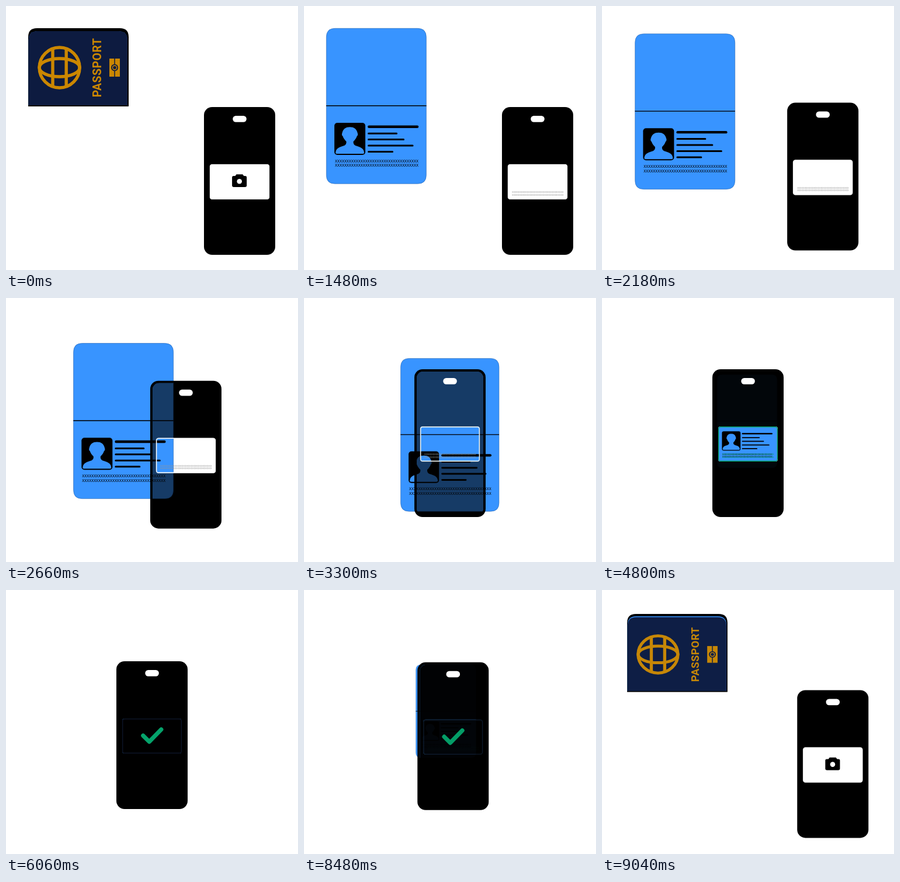
An HTML page that plays this animation: 500x452 px, repeating every 9.06 s.

```html
<!DOCTYPE html>
<html lang="en">
<head>
<meta charset="utf-8">
<title>Passport scan</title>
<style>
html, body { margin: 0; width: 100%; height: 100%; overflow: hidden; background: #fff; }
svg { display: block; width: 100vw; height: 100vh; }
.mrz { font: 6.6px "DejaVu Sans Mono", monospace; }
.title { font: 700 19.5px Roboto, sans-serif; letter-spacing: .45px; }
</style>
</head>
<body>
<svg viewBox="0 0 500 452">
  <defs>
    <clipPath id="screenClip"><rect class="phone" x="4" y="4" width="114" height="245" rx="11"/></clipPath>
    <clipPath id="windowClip"><rect class="phone" x="10" y="98" width="102" height="60" rx="4"/></clipPath>
    <g id="mrz" class="mrz">
      <text id="row1" x="15" y="229.8"></text>
      <text id="row2" x="15" y="237.4"></text>
    </g>
  </defs>

  <g id="passport">
    <path id="base" d="M0 133.8V15Q0 0 15 0H157Q172 0 172 15V133.8Z"/>
    <path id="page" fill="#3894ff"/>
    <g id="data">
      <path d="M.3 132.5H171.3V251.5Q171.3 266.3 156.5 266.3H15Q.3 266.3 .3 251.5Z" fill="#3894ff" stroke="#1f5fae" stroke-width=".6"/>
      <rect x="14" y="162" width="53" height="55" rx="5"/>
      <path fill="#3894ff" d="M16 213C17 205 22 204 31 201Q35 199 34.5 194Q29.5 189 28.5 185Q26 183 27.3 179.5C29 172.5 33 169.3 40.5 169.3S52 172.5 53.7 179.5Q55 183 52.5 185Q51.5 189 46.5 194Q46 199 50 201C59 204 64 205 65 213Q65 215 62 215H19Q16 215 16 213Z"/>
      <g stroke="#000" stroke-width="3" stroke-linecap="round">
        <path d="M73.2 168.8H156" stroke-width="4.4"/>
        <path d="M72.5 180.2H120.5M72.5 190.6H132.5M72.5 201.1H148M72.5 211.6H113.5"/>
      </g>
      <use href="#mrz"/>
    </g>
    <g id="cover">
      <path fill="#0d1b40" d="M.8 132.5V20Q.8 5 15.8 5H155Q170 5 170 20V132.5Z"/>
      <g id="art" fill="#cb8700">
        <g fill="none" stroke="#cb8700" stroke-width="5.4">
          <circle cx="53.6" cy="67.5" r="34.5"/>
          <ellipse cx="53.6" cy="67.5" rx="34.5" ry="15.5"/>
          <path d="M42 36V99M65.2 36V99"/>
        </g>
        <text class="title" text-anchor="middle" transform="translate(125 67.5) rotate(-90)">PASSPORT</text>
        <rect x="139" y="52" width="18" height="31"/>
        <path d="M148 52V83" stroke="#0d1b40" stroke-width="1.5"/>
        <circle cx="148" cy="67.5" r="6" fill="#0d1b40"/>
        <circle cx="148" cy="67.5" r="4.2"/>
        <circle cx="148" cy="67.5" r="2.8" fill="#0d1b40"/>
      </g>
    </g>
    <path d="M0 132.8H171.5" stroke="#000" stroke-width="1.4"/>
  </g>

  <rect class="phone" width="122" height="253" rx="14"/>
  <g clip-path="url(#screenClip)">
    <use href="#passport"/>
    <rect id="shade" width="500" height="452"/>
  </g>
  <g clip-path="url(#windowClip)">
    <rect id="blank" width="500" height="452"/>
    <use href="#passport"/>
    <rect id="cloak" width="500" height="452"/>
  </g>
  <g class="phone">
    <rect x="49.3" y="15" width="23.5" height="10.8" rx="5.2" fill="#fff"/>
    <rect id="rim" x="9.8" y="97.8" width="102.4" height="60.4" rx="4.3" fill="none" stroke="#888" stroke-width=".4"/>
    <rect id="frame" x="10.7" y="98.7" width="100.6" height="58.6" rx="3.6" fill="none" stroke-width="1.4"/>
    <use id="guide" href="#mrz" transform="translate(7.7 4.5) scale(.62)"/>
    <g id="camera">
      <path d="M50.5 118H53.5L55.5 115.3H66.3L68.3 118H70.8Q73.2 118 73.2 120.4V134.6Q73.2 137 70.8 137H50.5Q48.1 137 48.1 134.6V120.4Q48.1 118 50.5 118Z"/>
      <circle cx="60.7" cy="127.2" r="4.3" fill="#fff"/>
    </g>
    <path id="check" d="M45.8 127.4L56.3 137.8L76.8 116.8" fill="none" stroke="#05a36b" stroke-width="7.2" stroke-linecap="round" stroke-linejoin="round"/>
  </g>
</svg>
<script>
const LOOP = 9060, FOLD = 132.5;
const $ = id => document.getElementById(id);
const phoneParts = document.querySelectorAll('.phone');
const set = (id, name, value) => $(id).setAttribute(name, value);
const seg = (t, a, b) => Math.min(1, Math.max(0, (t - a) / (b - a)));
const lerp = (a, b, p) => a + (b - a) * p;
const mix = (a, b, p) => a.map((v, i) => lerp(v, b[i], p));
const rgb = c => `rgb(${c.map(Math.round)})`;
const easeIn = p => p ** 3;
const easeSine = p => (1 - Math.cos(Math.PI * p)) / 2;
const scaleAt = (y, sx, sy) => `translate(0 ${y}) scale(${sx} ${sy}) translate(0 ${-y})`;

// passport poses: x, y, scale
const HOME = [38, 38, 1], CENTRE = [164, 102, 1], FITTED = [197, 131, .6];
const WHITE = [255, 255, 255], GREEN = [5, 163, 107], DARK = [12, 20, 38], GREY = [150, 150, 150];

$('row1').textContent = $('row2').textContent = 'X'.repeat(36);

function drawPassport(open, [x, y, size]) {
  set('passport', 'transform', `translate(${x} ${y}) scale(${size})`);
  const turn = Math.cos(Math.PI * open);
  const inset = 5 * Math.max(0, 1 - 8 * open);
  const left = .3 + inset * .1, right = 171.3 - inset * .3, top = .3 + inset;
  set('page', 'd', `M${left} ${FOLD}V${top + 15}Q${left} ${top} ${left + 15} ${top}H${right - 15}Q${right} ${top} ${right} ${top + 15}V${FOLD}Z`);
  set('page', 'stroke', open > .5 ? '#1f5fae' : 'none');
  set('page', 'stroke-width', .6);
  set('base', 'visibility', open > .5 ? 'hidden' : 'inherit');
  const closed = turn > .001, opened = turn < -.001;
  set('cover', 'display', closed ? 'inline' : 'none');
  set('data', 'display', opened ? 'inline' : 'none');
  if (closed) {
    set('cover', 'transform', scaleAt(FOLD, 1, turn));
    set('cover', 'opacity', 1 - open);
    set('art', 'transform', scaleAt(90, 1 - .4 * open, (1 - 2 * open) ** 1.2 / turn));
  }
  if (opened) set('data', 'transform', scaleAt(FOLD, 1, -turn));
}

function draw(t) {
  const back = seg(t, 8460, LOOP), stay = 1 - back;
  const open = back ? stay : easeSine(seg(t, 960, 1480));
  const move = easeIn(seg(t, 1400, 2884));
  const fit = easeIn(seg(t, 2900, 4084));
  const dark = seg(t, 4250, 4860) * stay;
  const done = seg(t, 5820, 6060) * stay;

  const pose = mix(mix(HOME, CENTRE, move), FITTED, fit);
  const [x, y] = mix(pose, HOME, back);
  drawPassport(open, [x, y, lerp(pose[2], HOME[2], easeSine(back))]);

  const px = lerp(339, 189, move * stay), py = lerp(173, 122, move * stay);
  phoneParts.forEach(el => el.setAttribute('transform', `translate(${px} ${py})`));

  const result = back > .5 ? 0 : done;
  const lock = fit * stay;
  set('shade', 'opacity', .6 + .4 * dark);
  set('cloak', 'opacity', result);
  set('check', 'opacity', result);
  set('blank', 'fill', result > .5 ? '#000' : '#fff');
  set('frame', 'stroke', rgb(back > .5 ? WHITE : mix(mix(WHITE, GREEN, lock), DARK, done)));
  set('rim', 'opacity', 1 - Math.max(lock, done));
  set('guide', 'fill', rgb(mix(GREY, GREEN, lock)));
  set('guide', 'opacity', open > .5 ? 1 - done : 0);
  set('camera', 'opacity', open < .5 ? 1 : 0);
}

const start = performance.now();
function tick() {
  draw((performance.now() - start) % LOOP);
  requestAnimationFrame(tick);
}
draw(0);
requestAnimationFrame(tick);
</script>
</body>
</html>
```
